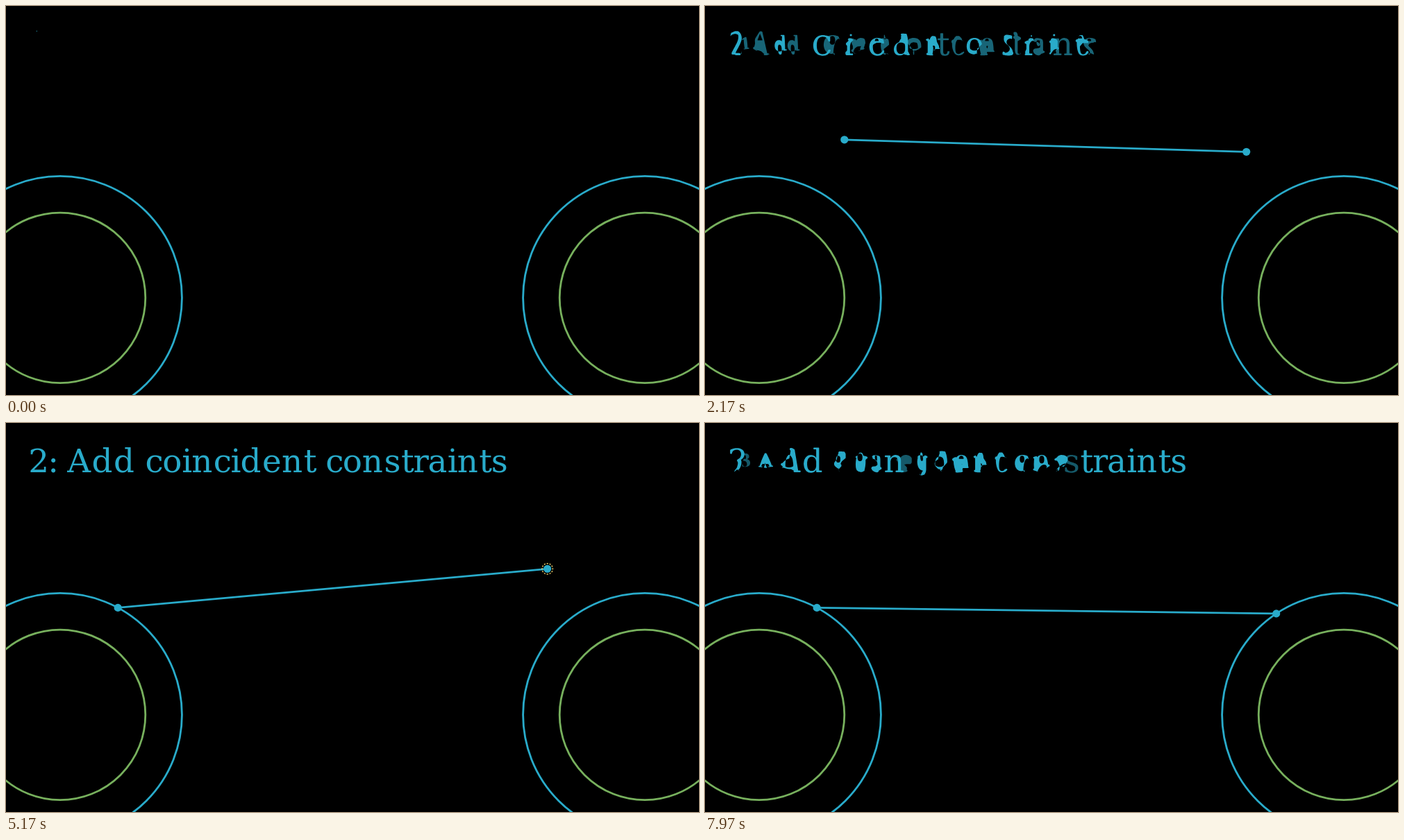
Animation, 998 px wide and 561 px high, one loop 8 s. Source, as an HTML page with a canvas:

```html
<!DOCTYPE html>
<html lang="en">
<head>
<meta charset="utf-8">
<title>Coincident constraints</title>
<style>
  html, body { margin: 0; width: 100%; height: 100%; overflow: hidden; background: #000; }
  canvas { display: block; }
</style>
</head>
<body>
<canvas id="stage" width="998" height="561"></canvas>
<script>
const ctx = document.getElementById('stage').getContext('2d');
const LOOP = 8000, STEP = 867;
const UNIT = 998 * 9 / 128;          // pixels per scene unit
const BLUE = '#29abca', GREEN = '#77b05d', YELLOW = '#f7d96f';
const STROKE = 0.04 * UNIT;

const clamp = v => Math.min(1, Math.max(0, v));
const mix = (a, b, t) => a + (b - a) * t;
const mixPoint = (p, q, t) => [mix(p[0], q[0], t), mix(p[1], q[1], t)];
const point = (x, y) => [499 + x * UNIT, 280.5 - y * UNIT];
const sigmoid = x => 1 / (1 + Math.exp(-x));
const smooth = t => {
  const edge = sigmoid(-5);
  return clamp((sigmoid(10 * (t - 0.5)) - edge) / (1 - 2 * edge));
};
const progress = (time, start, length = STEP) => clamp((time - start) / length);
const eased = (time, start) => smooth(progress(time, start));

// ---- Titles -------------------------------------------------------------

const EM = UNIT * 2 / 3, LEFT = UNIT / 2, BASELINE = 71;
const font = size => `${size}px "DejaVu Serif", serif`;

// Advances are rounded to a coarse grid of 20 steps per unit.
function layout(text) {
  const size = 1000;
  ctx.font = font(size);
  let x = LEFT + ctx.measureText(text[0]).actualBoundingBoxLeft * EM / size;
  const glyphs = [];
  for (const char of text) {
    if (char !== ' ') glyphs.push({ char, x });
    x += Math.round(ctx.measureText(char).width / size * 40 / 3) * UNIT / 20;
  }
  return glyphs;
}

const SAMPLES = 140;

function resample(loop) {
  const n = loop.length, reach = 2;
  const soft = loop.map((_, i) => {
    let x = 0, y = 0;
    for (let k = -reach; k <= reach; k++) {
      const p = loop[(i + k + n) % n];
      x += p[0];
      y += p[1];
    }
    return [x / (2 * reach + 1), y / (2 * reach + 1)];
  });
  return Array.from({ length: SAMPLES }, (_, i) => {
    const at = i * n / SAMPLES, k = Math.floor(at);
    return mixPoint(soft[k], soft[(k + 1) % n], at - k);
  });
}

// Walks the pixel edges of an enlarged glyph to get its closed outlines.
function trace(char) {
  const size = 300, scale = 4, ox = 60, oy = 220;
  const pad = document.createElement('canvas');
  pad.width = pad.height = size;
  const pen = pad.getContext('2d');
  pen.font = font(EM * scale);
  pen.fillText(char, ox, oy);
  const data = pen.getImageData(0, 0, size, size).data;
  const solid = (x, y) => data[(y * size + x) * 4 + 3] > 127;
  const edges = new Map();
  const link = (x0, y0, x1, y1) => {
    const key = y0 * size + x0;
    if (!edges.has(key)) edges.set(key, []);
    edges.get(key).push(y1 * size + x1);
  };
  for (let y = 1; y < size - 1; y++) {
    for (let x = 1; x < size - 1; x++) {
      if (!solid(x, y)) continue;
      if (!solid(x, y - 1)) link(x, y, x + 1, y);
      if (!solid(x + 1, y)) link(x + 1, y, x + 1, y + 1);
      if (!solid(x, y + 1)) link(x + 1, y + 1, x, y + 1);
      if (!solid(x - 1, y)) link(x, y + 1, x, y);
    }
  }
  const loops = [];
  while (edges.size) {
    const loop = [];
    let key = edges.keys().next().value;
    while (edges.has(key)) {
      loop.push([(key % size - ox) / scale, (Math.floor(key / size) - oy) / scale]);
      const ends = edges.get(key), next = ends.pop();
      if (!ends.length) edges.delete(key);
      key = next;
    }
    if (loop.length > 12) loops.push(loop);
  }
  return loops.sort((a, b) => b.length - a.length).map(resample);
}

const outlines = {};
const outline = char => outlines[char] ||= trace(char);

function addLoop(points, x) {
  points.forEach((p, i) => ctx[i ? 'lineTo' : 'moveTo'](x + p[0], BASELINE + p[1]));
  ctx.closePath();
}

function drawText(glyphs) {
  ctx.font = font(EM);
  for (const g of glyphs) ctx.fillText(g.char, g.x, BASELINE);
}

// Each glyph draws its border first, then fills.
function writeText(glyphs, t) {
  const lag = 0.2, span = 1 + lag * (glyphs.length - 1);
  ctx.lineWidth = STROKE / 2;
  ctx.strokeStyle = BLUE;
  glyphs.forEach((g, i) => {
    const a = clamp(t * span - i * lag);
    if (!a) return;
    const border = clamp(a * 2), fill = clamp(a * 2 - 1);
    for (const loop of outline(g.char)) {
      ctx.beginPath();
      loop.slice(0, Math.ceil(border * SAMPLES)).forEach((p, k) =>
        ctx[k ? 'lineTo' : 'moveTo'](g.x + p[0], BASELINE + p[1]));
      if (border === 1) ctx.closePath();
      ctx.globalAlpha = 1 - fill;
      ctx.stroke();
    }
    ctx.globalAlpha = fill;
    drawText([g]);
    ctx.globalAlpha = 1;
  });
}

// The shorter list repeats glyphs; the repeats are transparent.
function morphText(from, to, t) {
  const count = Math.max(from.length, to.length);
  const pick = (list, i) => list[Math.floor(i * list.length / count)];
  const opacity = (list, i) => i && pick(list, i) === pick(list, i - 1) ? 0 : 1;
  for (let i = 0; i < count; i++) {
    const a = pick(from, i), b = pick(to, i);
    const la = outline(a.char), lb = outline(b.char);
    const x = mix(a.x, b.x, t);
    ctx.globalAlpha = mix(opacity(from, i), opacity(to, i), t);
    ctx.beginPath();
    for (let k = 0; k < Math.max(la.length, lb.length); k++) {
      const loop = Array.from({ length: SAMPLES }, (_, s) => mixPoint(
        la[k] ? la[k][s] : la[0][0], lb[k] ? lb[k][s] : lb[0][0], t));
      addLoop(loop, x);
    }
    ctx.fill();
  }
  ctx.globalAlpha = 1;
}

const titles = [
  '1: Create line',
  '2: Add coincident constraints',
  '3: Add tangent constraints'
].map(layout);

function drawTitle(time) {
  ctx.fillStyle = BLUE;
  const first = progress(time, 0, 783);
  const second = eased(time, 1707), third = eased(time, 7545);
  if (first < 1) writeText(titles[0], first);
  else if (!second) drawText(titles[0]);
  else if (second < 1) morphText(titles[0], titles[1], second);
  else if (!third) drawText(titles[1]);
  else morphText(titles[1], titles[2], third);
}

// ---- Sketch -------------------------------------------------------------

const RADIUS = 2.5 * UNIT;
const leftCentre = point(-6, -2), rightCentre = point(6, -2);
const leftStart = point(-4.25, 1.25), rightStart = point(4, 1);

function onCircle(p, centre) {
  const dx = p[0] - centre[0], dy = p[1] - centre[1];
  return mixPoint(centre, p, RADIUS / Math.hypot(dx, dy));
}
const leftEnd = onCircle(leftStart, leftCentre);
const rightEnd = onCircle(rightStart, rightCentre);

function ring([x, y], radius, color) {
  ctx.beginPath();
  ctx.arc(x, y, radius, 0, 2 * Math.PI);
  ctx.strokeStyle = color;
  ctx.lineWidth = STROKE;
  ctx.stroke();
}

function segment(p, q, color, width) {
  ctx.beginPath();
  ctx.moveTo(...p);
  ctx.lineTo(...q);
  ctx.strokeStyle = color;
  ctx.lineWidth = width;
  ctx.stroke();
}

function dot([x, y]) {
  ctx.beginPath();
  ctx.arc(x, y, 0.08 * UNIT, 0, 2 * Math.PI);
  ctx.fillStyle = BLUE;
  ctx.fill();
}

// Rays run outwards: the tips first, then the tails catch up.
function flash([x, y], t) {
  if (t <= 0 || t >= 1) return;
  const inner = 0.1 * UNIT, length = 0.2 * UNIT, rays = 12;
  const tail = inner + length * clamp(2 * t - 1), tip = inner + length * clamp(2 * t);
  for (let i = 0; i < rays; i++) {
    const angle = i * 2 * Math.PI / rays, c = Math.cos(angle), s = Math.sin(angle);
    segment([x + c * tail, y + s * tail], [x + c * tip, y + s * tip], YELLOW, 0.03 * UNIT);
  }
}

function draw(time) {
  ctx.fillStyle = '#000';
  ctx.fillRect(0, 0, 998, 561);
  for (const centre of [leftCentre, rightCentre]) {
    ring(centre, RADIUS, BLUE);
    ring(centre, 1.75 * UNIT, GREEN);
  }
  if (time >= 783) {
    const grown = eased(time, 783);
    const left = mixPoint(leftStart, leftEnd, eased(time, 4085));
    const right = mixPoint(rightStart, rightEnd, eased(time, 6670));
    segment(left, mixPoint(left, right, grown), BLUE, STROKE);
    dot(left);
    if (grown === 1 || time >= 783 + STEP) dot(right);
    flash(left, eased(time, 2574));
    flash(right, eased(time, 4985));
  }
  drawTitle(time);
}

const began = performance.now();
function tick() {
  draw((performance.now() - began) % LOOP);
  requestAnimationFrame(tick);
}
tick();
</script>
</body>
</html>
```
